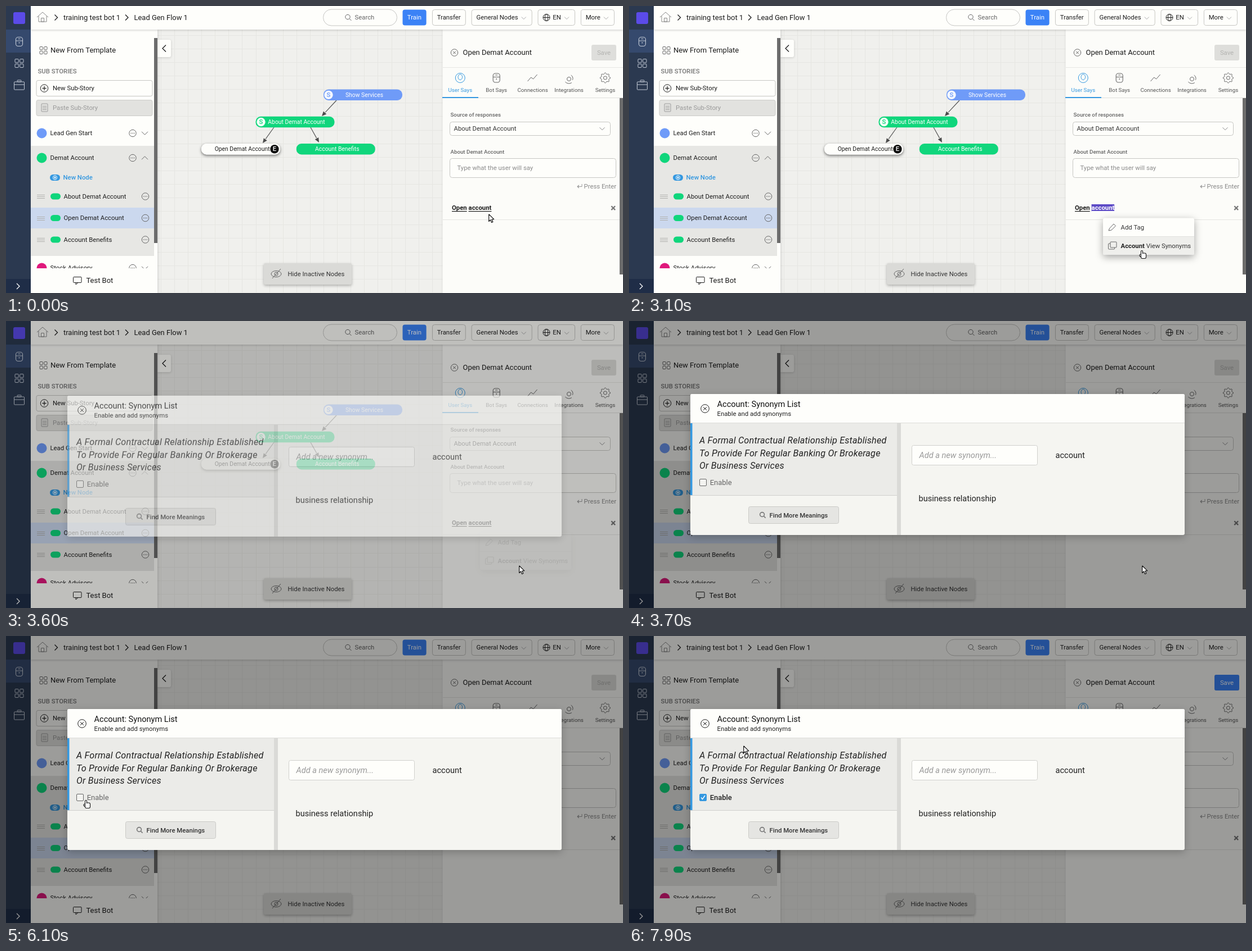
Recreate the animation shown at these times as an HTML page with a canvas. Size 1096x511 px, loop 8 s.

```html
<!DOCTYPE html>
<html lang="en">
<head>
<meta charset="utf-8">
<title>Synonym list</title>
<style>
  html, body { margin: 0; width: 100%; height: 100%; overflow: hidden; }
  canvas { display: block; }
</style>
</head>
<body>
<canvas id="stage" width="1096" height="511"></canvas>
<script>
const W = 1096, H = 511, LOOP = 8000, STEP = 100;
const stage = document.getElementById('stage').getContext('2d');
const layer = Object.assign(document.createElement('canvas'), { width: W, height: H }).getContext('2d');
let ctx = stage;

// The page is shown zoomed out, so type sizes are CSS sizes times the zoom
const ZOOM = 0.8105;
const [SMALL, BODY, LARGE, TITLE, QUOTE] = [12, 14, 16, 18, 20].map(px => px * ZOOM);
const NODE = 10.35, CELL = 24.1;
const INK = '#1c1c1c', GREY = '#666', PALE = '#9a9a9a', EDGE = '#c6c6c3', WHITE = '#fefefb';
const BLUE = '#3b82f6', SKY = '#3498e0', GREEN = '#10d67c', PERI = '#6f9bf8';

const progress = (t, a, b) => Math.max(0, Math.min(1, (t - a) / (b - a)));
const smooth = k => k * k * (3 - 2 * k);

// y is the middle of the capital letters
function text(str, x, y, size = BODY, color = INK, style = '', align = 'left') {
  ctx.font = `${style} ${size}px Roboto, sans-serif`;
  ctx.textAlign = align;
  ctx.fillStyle = color;
  ctx.fillText(str, x, y + size * 0.355 - 0.3);
  return ctx.measureText(str).width;
}
const centered = (str, x, y, size, color, style) => text(str, x, y, size, color, style, 'center');

function fill(x, y, w, h, color) {
  ctx.fillStyle = color;
  ctx.fillRect(x, y, w, h);
}

function paint(fillColor, strokeColor, width = 1) {
  if (fillColor) { ctx.fillStyle = fillColor; ctx.fill(); }
  if (strokeColor) { ctx.strokeStyle = strokeColor; ctx.lineWidth = width; ctx.stroke(); }
}

function box(x, y, w, h, r, ...style) {
  ctx.beginPath();
  ctx.roundRect(x, y, w, h, r);
  paint(...style);
}

function oval(x, y, rx, ry, ...style) {
  ctx.beginPath();
  ctx.ellipse(x, y, rx, ry, 0, 0, Math.PI * 2);
  paint(...style);
}
const circle = (x, y, r, ...style) => oval(x, y, r, r, ...style);

function path(points, ...style) {
  ctx.beginPath();
  points.forEach(([x, y]) => ctx.lineTo(x, y));
  paint(...style);
}
const line = (x1, y1, x2, y2, color, width) => path([[x1, y1], [x2, y2]], null, color, width);

function shadowed(blur, dy, alpha, draw) {
  ctx.save();
  ctx.shadowColor = `rgba(0,0,0,${alpha})`;
  ctx.shadowBlur = blur;
  ctx.shadowOffsetY = dy;
  draw();
  ctx.restore();
}

// Draws a whole group at one opacity
function group(alpha, dy, draw) {
  if (alpha <= 0) return;
  layer.clearRect(0, 0, W, H);
  ctx = layer;
  draw();
  ctx = stage;
  ctx.globalAlpha = alpha;
  ctx.drawImage(layer.canvas, 0, dy);
  ctx.globalAlpha = 1;
}

const chevronV = (x, y, s, dir, color = GREY) =>
  path([[x - s, y - dir * s / 2], [x, y + dir * s / 2], [x + s, y - dir * s / 2]], null, color);
const chevronH = (x, y, s, dir, color = INK) =>
  path([[x - dir * s / 2, y - s], [x + dir * s / 2, y], [x - dir * s / 2, y + s]], null, color, 1.3);

function cross(x, y, d, color, width) {
  line(x - d, y - d, x + d, y + d, color, width);
  line(x + d, y - d, x - d, y + d, color, width);
}

function closeIcon(x, y, r, color) {
  circle(x, y, r, null, color);
  cross(x, y, r * 0.4, color);
}

function dotsIcon(x, y) {
  circle(x, y, 6.2, null, GREY);
  [-2.8, 0, 2.8].forEach(d => circle(x + d, y, 0.8, GREY));
}

function gridIcon(x, y, size, color) {
  const tile = size / 2 - 1.2;
  for (const dx of [-size / 2, 1.2]) for (const dy of [-size / 2, 1.2])
    box(x + dx, y + dy, tile, tile, 1, null, color);
}

function botIcon(x, y, color) {
  box(x - 6, y - 8, 12, 16, 4, null, color, 1.1);
  line(x - 6, y - 1.5, x + 6, y - 1.5, color);
  line(x - 2, y - 5, x + 2, y - 5, color);
  circle(x, y + 2, 1, color);
}

function searchIcon(x, y, r, color, width) {
  circle(x - 1, y - 1, r, null, color, width);
  line(x + r * 0.5, y + r * 0.5, x + r * 1.3, y + r * 1.3, color, width);
}

function plusIcon(x, y, r, color) {
  const d = r * 0.55;
  circle(x, y, r, null, color);
  line(x - d, y, x + d, y, color, 1.2);
  line(x, y - d, x, y + d, color, 1.2);
}

function globeIcon(x, y, r) {
  circle(x, y, r, null, INK);
  oval(x, y, r * 0.45, r, null, INK);
  line(x - r, y, x + r, y, INK);
}

function gearIcon(x, y) {
  const turns = Array.from({ length: 49 }, (_, i) => i / 48 * Math.PI * 2);
  path(turns.map(a => {
    const r = 8 + 1.2 * Math.cos(a * 8);
    return [x + r * Math.cos(a), y + r * Math.sin(a)];
  }), null, GREY);
  circle(x, y, 3, null, GREY);
}

const column = c => 274.8 + c * CELL;
const row = r => 158.3 + r * CELL;

function node(c, r, color, label, ink = '#fff') {
  box(column(c), row(r) - 9.7, 140, 19.4, 9, color);
  centered(label, column(c) + 72.5, row(r), NODE, ink);
}

function badge(x, y, letter, back, front) {
  circle(x, y, 7.7, back);
  centered(letter, x, y, BODY, front, '500');
}

function arrow(x1, y1, x2, y2) {
  const a = Math.atan2(y2 - y1, x2 - x1);
  const back = s => [x2 - 9 * Math.cos(a + s), y2 - 9 * Math.sin(a + s)];
  line(x1, y1, ...back(0), '#555', 1.2);
  path([[x2, y2], back(0.42), back(-0.42)], '#4a4a4a');
}

function drawFlow() {
  fill(269, 42, 507, 469, '#f0f0ed');
  for (let x = column(0); x < 775; x += CELL) fill(Math.round(x), 42, 1, 469, '#e6e6e2');
  for (let y = row(-4) - 10; y < H; y += CELL) fill(269, Math.round(y), 507, 1, '#e6e6e2');
  arrow(587, 168, 561, 196);
  arrow(476, 216, 456, 244);
  arrow(541, 216, 556, 243);
  node(12, 0, PERI, 'Show Services');
  badge(573, row(0), 'S', '#f4f8ff', PERI);
  node(7, 2, GREEN, 'About Demat Account');
  badge(453, row(2), 'S', '#f2fff8', GREEN);
  shadowed(5, 2, 0.55, () => box(column(3), row(4) - 9.7, 140, 19.4, 9, WHITE));
  node(3, 4, WHITE, 'Open Demat Account', INK);
  badge(477, row(4), 'E', '#111', '#fff');
  node(10, 4, GREEN, 'Account Benefits');

  shadowed(5, 2, 0.28, () => box(458, 458, 156, 38, 3, '#dadad7'));
  oval(480, 477, 9, 5.5, null, GREY);
  circle(480, 477, 3, null, GREY);
  line(473, 485, 488, 468, GREY);
  text('Hide Inactive Nodes', 500.5, 477.5, BODY, '#333');

  shadowed(4, 1, 0.16, () => box(269, 60, 24, 31, [0, 3, 3, 0], WHITE));
  chevronH(281, 75.5, 6, -1);
}

function storyRow(y, color, label, dir) {
  circle(63.5, y, 9, color);
  text(label, 78.5, y);
  dotsIcon(225, y);
  chevronV(246.5, y, 5.5, dir);
}

function nodeRow(y, label) {
  [-3, 0, 3].forEach(d => fill(55, Math.round(y + d), 14, 1, '#b0b0ad'));
  box(79, y - 5.5, 18, 11, 5.5, GREEN);
  text(label, 102.5, y);
  dotsIcon(247.5, y);
}

function drawStories() {
  shadowed(5, 0, 0.2, () => fill(44, 42, 225, 469, WHITE));
  gridIcon(66.5, 79, 13, GREY);
  text('New From Template', 79, 79, LARGE);
  text('SUB STORIES', 56.5, 116.5, BODY, '#777', '500');
  box(54, 132.5, 206, 28, 3, WHITE, EDGE);
  plusIcon(68, 146.5, 6.7, INK);
  text('New Sub-Story', 83, 146.5);
  box(54, 167.5, 206, 28, 3, '#e2e2df', '#cbcbc8');
  box(63, 174, 11, 14, 1, null, PALE);
  [-3, 0, 3].forEach(d => line(65, 181.5 + d, 72, 181.5 + d, PALE));
  text('Paste Sub-Story', 83, 181.5, BODY, PALE);

  storyRow(226.5, PERI, 'Lead Gen Start', 1);
  fill(44, 249, 219, 196, '#e7e7e4');
  storyRow(270.5, GREEN, 'Demat Account', -1);
  box(78, 300, 18, 11, 5.5, SKY);
  plusIcon(87, 305.5, 3.6, '#fff');
  text('New Node', 101.5, 305.5, BODY, SKY, '500');
  fill(44, 359, 219, 37, '#cbd8ee');
  ['About Demat Account', 'Open Demat Account', 'Account Benefits'].forEach((label, i) =>
    nodeRow(339 + i * 38.5, label));
  storyRow(466.5, '#e0187c', 'Stock Advisory', 1);
  fill(263, 57, 6, 365, '#6c6c6c');

  fill(44, 467, 225, 44, WHITE);
  box(119.5, 482.5, 14.5, 10, 1, null, INK);
  path([[124, 492.5], [124, 496], [128, 492.5]], null, INK);
  text('Test Bot', 142.5, 489, LARGE);
}

function drawSidebar() {
  const pale = '#c3cad6';
  fill(0, 0, 44, H, '#2b3950');
  fill(0, 42, 44, 41, '#35496d');
  box(13, 11, 21, 21, 3, '#5b4be8');
  botIcon(23.5, 63.5, pale);
  gridIcon(23.5, 102, 15, pale);
  box(14.5, 135, 18, 14, 1, null, pale);
  box(20, 132, 7, 3, 1, null, pale);
  line(14.5, 140, 32.5, 140, pale);
  fill(0, 486, 44, 25, '#1f2d47');
  chevronH(21.5, 499, 5, 1, '#fff');
}

// Buttons flow from left to right, each as wide as its content
function drawTopButtons() {
  let x = 704.5;
  for (const label of ['Train', 'Transfer', 'General Nodes', 'EN', 'More']) {
    const main = label === 'Train', plain = main || label === 'Transfer';
    const icon = label === 'EN' ? 18 : 0;
    ctx.font = `${BODY}px Roboto, sans-serif`;
    const w = ctx.measureText(label).width + icon + (plain ? 17 : 33);
    box(x, 6.5, w, 28, 4, main ? BLUE : WHITE, main ? null : EDGE);
    if (icon) globeIcon(x + 15, 20.5, 6);
    text(label, x + 8.3 + icon, 20.5, BODY, main ? '#fff' : INK);
    if (!plain) chevronV(x + w - 14.5, 21.5, 4, 1, '#aaa');
    x += w + 10.8;
  }
}

function drawTopBar() {
  shadowed(4, 1, 0.2, () => fill(44, 0, 1052, 42, WHITE));
  path([[55, 20], [65, 11], [75, 20]], null, '#888');
  path([[58, 18], [58, 28], [72, 28], [72, 18]], null, '#888');
  box(62.5, 21.5, 5, 6.5, 0, null, '#888');
  chevronH(89, 20.5, 5, 1);
  text('training test bot 1', 102, 20.5, LARGE);
  chevronH(214.5, 20.5, 5, 1);
  text('Lead Gen Flow 1', 227.5, 20.5, LARGE);
  box(563.5, 6, 131, 29, 14.5, WHITE, EDGE);
  searchIcon(608, 20.5, 4.2, GREY);
  text('Search', 619.5, 20.5, BODY, GREY);
  drawTopButtons();
}

function drawTabs() {
  const labels = ['User Says', 'Bot Says', 'Connections', 'Integrations', 'Settings'];
  const tab = i => 806.8 + i * 64.4;
  labels.forEach((label, i) => centered(label, tab(i), 149.5, SMALL, i ? '#555' : SKY));
  const y = 128;
  circle(tab(0), y, 8.5, null, SKY);
  oval(tab(0), y - 1.5, 3.8, 5, null, SKY);
  botIcon(tab(1), y, GREY);
  path([[-9, 6], [-3, -1], [1, 2], [8, -6]].map(([dx, dy]) => [tab(2) + dx, y + dy]), null, GREY);
  circle(tab(3), y + 2, 3.5, null, GREY);
  [7, 9].forEach(r => {
    ctx.beginPath();
    ctx.arc(tab(3), y + 1, r, r - 8, r - 6.6);
    paint(null, GREY);
  });
  gearIcon(tab(4), y);
}

function drawPhrase(selected, caret) {
  const under = (x, w, color) => fill(x, 365, w, 1.2, color);
  const color = selected ? '#fff' : INK;
  const w = text('Open', 792, 359.5, BODY, INK, 'bold');
  under(792, w, INK);
  const x = 792 + w + 2.9;
  if (selected) fill(x, 353, 40.5, 13, '#5d4bc6');
  under(x, text('account', x, 359.5, BODY, color, 'bold'), color);
  if (caret) fill(861, 353, 1, 13, INK);
}

function drawPanel(t) {
  shadowed(4, 0, 0.16, () => fill(775.5, 42, 321, 469, '#fcfcf9'));
  closeIcon(796.5, 83, 6.2, GREY);
  text('Open Demat Account', 811.5, 83, LARGE);
  const active = progress(t, 6600, 7100);
  box(1040, 69, 44, 28, 3, '#dededb');
  group(active, 0, () => box(1040, 69, 44, 28, 3, BLUE));
  centered('Save', 1062, 83, BODY, active > 0.3 ? '#fff' : '#b3b3b0');
  fill(776, 109, 320, 1, '#e6e6e3');
  drawTabs();
  fill(776, 163, 320, 1, '#dfdfdc');
  fill(775, 162, 64, 2, SKY);

  text('Source of responses', 789.5, 193.5, SMALL, GREY, '500');
  box(788.5, 206.5, 285, 24, 4, WHITE, EDGE);
  text('About Demat Account', 795.5, 218, BODY, '#333');
  chevronV(1059, 218.5, 4.5, 1, '#888');
  text('About Demat Account', 789.5, 260, SMALL, GREY, '500');
  box(788.5, 271.5, 295, 34, 4, WHITE, EDGE);
  text('Type what the user will say', 801.5, 288.5, BODY, '#8b8b8b');
  path([[1023, 317], [1023, 321.5], [1015.5, 321.5]], null, '#999');
  chevronH(1016.5, 321.5, 2.5, -1, '#999');
  text('Press Enter', 1026.5, 321, BODY, '#888');

  drawPhrase(t >= 1800 && t < 3300, t >= 900 && t < 1400);
  cross(1078.7, 359.7, 3.4, '#777', 2.2);
  fill(776, 380, 314, 1, '#e4e4e1');
  fill(1090, 164, 6, 314, '#6c6c6c');
}

function drawMenu(highlight) {
  shadowed(14, 4, 0.35, () => box(842, 377.5, 162, 65.5, 3, WHITE));
  if (highlight) box(842, 410, 162, 33, [0, 0, 3, 3], '#efefec');
  fill(842, 410, 162, 1, '#e1e1de');
  path([[852, 400], [853.5, 396], [861, 388], [864.5, 391.5], [857, 399], [852, 400]], null, GREY);
  text('Add Tag', 873.5, 394.5, BODY, '#333');
  box(851.5, 423, 11, 10, 1, null, GREY);
  box(855, 420, 11, 10, 1, highlight ? '#efefec' : WHITE, GREY);
  const w = text('Account', 873.5, 427.5, BODY, '#222', 'bold');
  text(' View Synonyms', 873.5 + w, 427.5, BODY, '#333');
}

function drawDialog(checked) {
  shadowed(14, 4, 0.22, () => box(109, 130, 878, 251, 3, '#f5f5f1'));
  box(109, 130, 878, 51, [3, 3, 0, 0], WHITE);
  fill(109, 181, 878, 1, '#dcdcd9');
  closeIcon(135, 156, 7.3, INK);
  text('Account: Synonym List', 156.5, 148.5, TITLE, '#111');
  text('Enable and add synonyms', 156.5, 165.5, BODY, '#222');

  fill(109, 182, 367, 128, '#ebebe8');
  fill(109, 182, 3.5, 128, SKY);
  fill(109, 310, 367, 1, '#d0d0cd');
  fill(476, 182, 7, 199, '#dadad7');
  ctx.letterSpacing = `${QUOTE * 0.0125}px`;
  ['A Formal Contractual Relationship Established',
   'To Provide For Regular Banking Or Brokerage',
   'Or Business Services'].forEach((str, i) => text(str, 125, 212.5 + i * 22.6, QUOTE, '#222', 'italic'));
  ctx.letterSpacing = '0px';

  box(125.5, 281.5, 12, 12, 1.5, checked ? SKY : '#f3f3f0', checked ? SKY : GREY);
  if (checked) path([[128, 287.5], [130.5, 290.5], [135, 284]], null, '#fff', 1.4);
  text('Enable', 143.7, 287.5, LARGE, checked ? '#222' : GREY, checked ? '500' : '');
  box(212.5, 330.5, 160, 30, 3, '#e5e5e2', '#cacac7');
  searchIcon(237.5, 345.5, 3.9, '#777', 1.6);
  text('Find More Meanings', 249.5, 346, BODY, '#333', '500');

  box(502.5, 221.5, 223, 35, 3, WHITE, '#d0d0cd');
  text('Add a new synonym...', 515.5, 239.5, TITLE, PALE, 'italic');
  text('account', 757.5, 239.5, TITLE, '#222');
  text('business relationship', 514.5, 316.5, TITLE, '#222');
}

// Each move glides to a new tip position, swinging sideways by "bow" on the way
const MOVES = [
  { from: 0, to: 300, x: 846, y: 368, bow: -55 },
  { from: 1300, to: 1600, x: 851, y: 356 },
  { from: 2400, to: 3100, x: 911, y: 435 },
  { from: 4000, to: 4300, x: 383, y: 311 },
  { from: 4500, to: 4700, x: 334, y: 358 },
  { from: 4800, to: 5400, x: 157, y: 292 },
  { from: 5500, to: 6100, x: 142, y: 292, bow: 24 },
  { from: 7200, to: 7300, x: 175, y: 292 },
  { from: 7400, to: 7900, x: 203, y: 195, bow: 160 }
];

function pointerAt(t) {
  let x = 857, y = 370;
  for (const move of MOVES) {
    const k = smooth(progress(t, move.from, move.to));
    x += (move.x - x) * k + (move.bow || 0) * Math.sin(Math.PI * k);
    y += (move.y - y) * k;
  }
  return [x, y];
}

function drawPointer(t) {
  const hand = (t >= 2700 && t < 3300) || (t >= 5900 && t < 7300);
  ctx.save();
  ctx.translate(...pointerAt(t));
  ctx.lineJoin = 'round';
  if (hand) {
    box(-4, 7, 5, 4, 2, '#fff', '#111', 1.1);
    box(-1.5, 5, 9, 9.5, 2.5, '#fff', '#111', 1.1);
    box(-1.5, 0.5, 3, 9, 1.5, '#fff', '#111', 1.1);
    fill(-1, 6, 3, 5, '#fff');
  } else {
    path([[.7, .8], [.7, 13.5], [3.6, 10.8], [5.6, 15.5], [7.8, 14.5], [5.8, 10], [9.7, 9.6], [.7, .8]],
      '#fff', '#111', 1.2);
  }
  ctx.restore();
}

function draw(t) {
  drawFlow();
  drawStories();
  drawPanel(t);
  drawTopBar();
  drawSidebar();

  const open = smooth(progress(t, 3450, 3700));
  group(progress(t, 1900, 2300) * (1 - open) ** 2, 0, () => drawMenu(t >= 2800 && t < 3300));
  fill(0, 0, W, H, `rgba(0,0,0,${0.39 * open})`);
  group(open, 8 * (1 - open), () => drawDialog(t >= 6700));
  drawPointer(t);
}

function frame() {
  const t = performance.now() % LOOP;
  draw(Math.floor(t / STEP) * STEP);
  requestAnimationFrame(frame);
}
frame();
</script>
</body>
</html>
```
